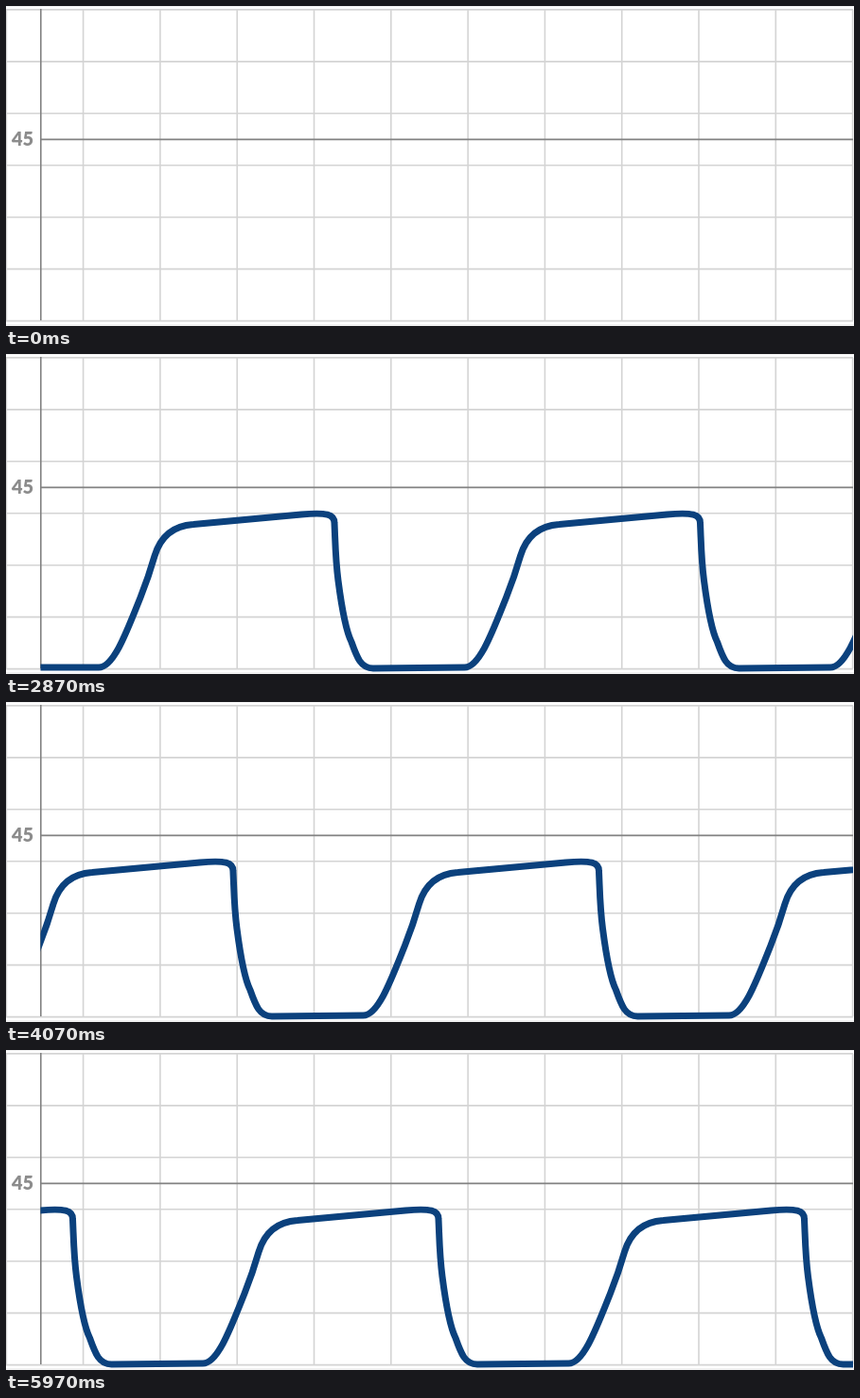
Write an HTML page with a canvas that moves like this. It is 896 px wide and 339 px high and loops after 6010 ms.

```html
<!DOCTYPE html>
<html lang="en">
<head>
<meta charset="utf-8">
<title>Waveform</title>
<style>
html, body { margin: 0; width: 100%; height: 100%; overflow: hidden; background: #fff; }
canvas { display: block; }
</style>
</head>
<body>
<canvas id="stage" width="896" height="339"></canvas>
<script>
const ctx = document.getElementById('stage').getContext('2d');
const LOOP = 6010;
const LEFT = 37, RIGHT = 895, PERIOD = 386.5;
const WIPE_START = 30, WIPE_END = 2430;
const SCROLL_START = 2500, SPEED = 0.0892;

function line(x1, y1, x2, y2, color, width) {
  ctx.strokeStyle = color;
  ctx.lineWidth = width;
  ctx.beginPath();
  ctx.moveTo(x1, y1);
  ctx.lineTo(x2, y2);
  ctx.stroke();
}

function drawGrid() {
  const gray = '#d4d4d4';
  line(0, 0.5, 896, 0.5, '#f2f2f2', 1);
  line(0, 338, 896, 338, '#ececec', 1.4);
  for (let i = 0; i <= 6; i++) {
    const y = 3.9 + i * 54.95;
    line(0, y, RIGHT, y, gray, 1.6);
  }
  line(0.5, 4, 0.5, 333, gray, 1.4);
  for (let i = 0; i <= 10; i++) {
    const x = 81.6 + i * 81.3;
    line(x, 4, x, 333, gray, 1.6);
  }
  line(36.8, 3, 36.8, 333, '#828282', 1.6);
  line(36.8, 141.4, RIGHT, 141.4, '#828282', 1.7);
  ctx.fillStyle = '#8c8c8c';
  ctx.font = '900 20px Lato, sans-serif';
  ctx.fillText('45', 6, 148.3);
}

// One breath: flat base, rise, plateau, sharp fall.
function addCycle(x) {
  const curve = (a, b, c, d, e, f) => ctx.bezierCurveTo(x + a, b, x + c, d, x + e, f);
  ctx.lineTo(x + 131, 332);
  curve(147, 332, 161, 293, 175, 258);
  curve(180.5, 244, 186, 228, 190, 214);
  curve(196, 194, 209, 182, 231, 180.5);
  ctx.lineTo(x + 345, 170);
  curve(372, 167.5, 380, 170, 380, 179);
  curve(381, 200, 381, 217, 384, 240);
  curve(388, 271, 392, 293, 398, 305);
  curve(404, 322, 408, 333, 421, 333);
}

function drawWave(t) {
  const shown = Math.min(1, Math.max(0, (t - WIPE_START) / (WIPE_END - WIPE_START)));
  if (!shown) return;
  const shift = Math.max(0, t - SCROLL_START) * SPEED;
  ctx.save();
  ctx.beginPath();
  ctx.rect(LEFT - 0.5, 0, (RIGHT - LEFT + 0.5) * shown, 339);
  ctx.clip();
  ctx.beginPath();
  ctx.moveTo(-shift, 332);
  for (let i = 0; i < 4; i++) addCycle(i * PERIOD - shift);
  ctx.strokeStyle = '#0b417d';
  ctx.lineWidth = 7;
  ctx.lineJoin = 'round';
  ctx.stroke();
  ctx.restore();
}

let start = null;
function frame(now) {
  if (start === null) start = now;
  const t = (now - start) % LOOP;
  ctx.fillStyle = '#fff';
  ctx.fillRect(0, 0, 896, 339);
  drawGrid();
  drawWave(Math.min(t, 5970));
  requestAnimationFrame(frame);
}
requestAnimationFrame(frame);
</script>
</body>
</html>
```
